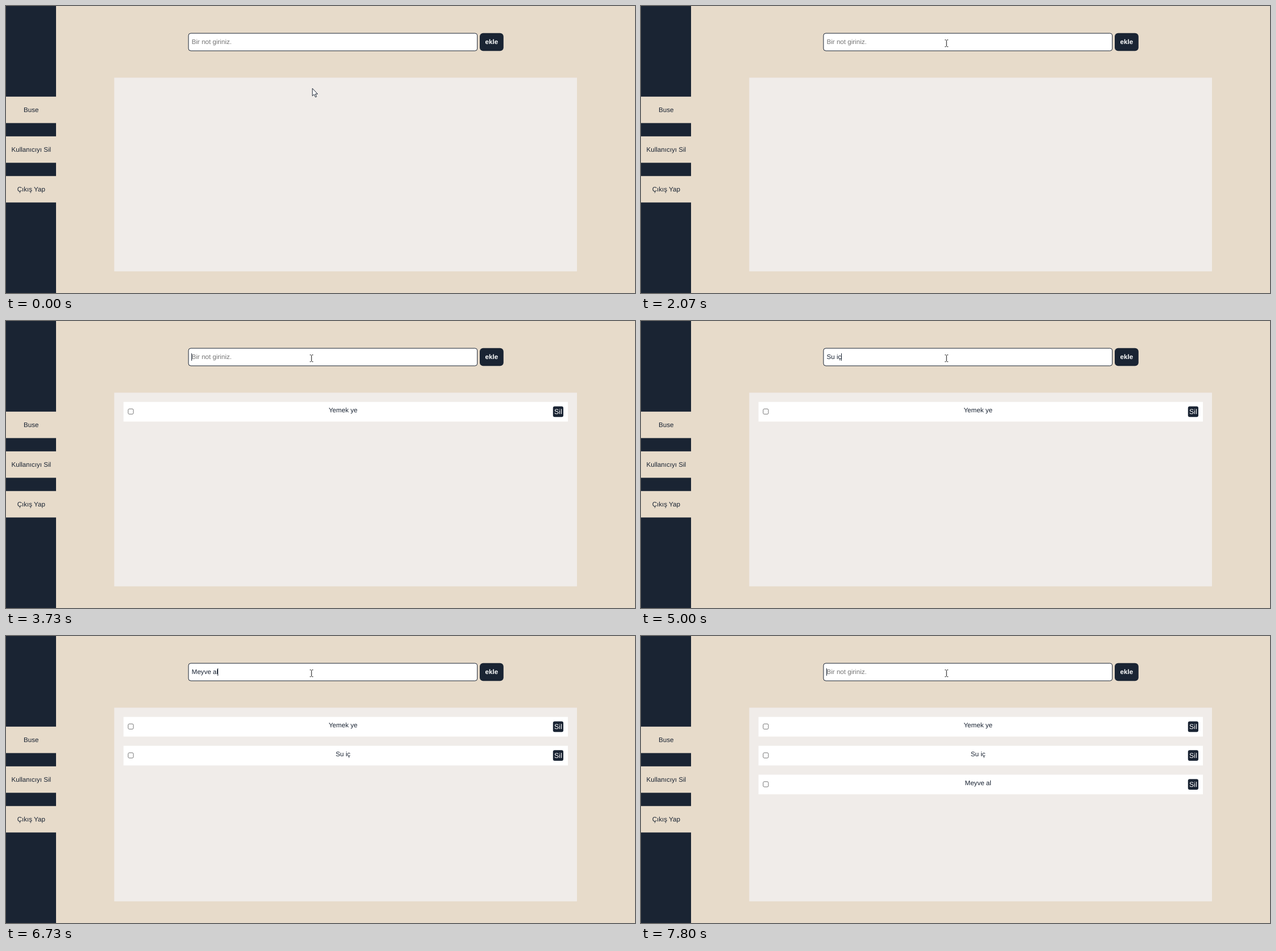
These frames come from a looping animation (1106x506 px, 8 s). An HTML page:

```html
<!DOCTYPE html>
<html lang="tr">
<head>
<meta charset="utf-8">
<style>
  html, body { margin: 0; width: 100%; height: 100%; overflow: hidden; background: #e7dbca; }
  svg { display: block; width: 1106px; height: 506px; }
  text { font: 11.6px "Liberation Sans", Arial, sans-serif; fill: #1a2433; white-space: pre; text-rendering: geometricPrecision; }
  .mid { text-anchor: middle; }
  .dark { fill: #1a2433; }
  .sand { fill: #e7dbca; }
  #field.hint { fill: #757575; }
  .add { font-weight: bold; fill: #fff; }
  .delete { font-size: 12.4px; fill: #fff; }
</style>
</head>
<body>
<svg viewBox="0 0 1106 506">
  <rect class="sand" width="1106" height="506"/>
  <rect class="dark" width="88" height="506"/>
  <g id="menu"></g>
  <rect x="320.9" y="48.1" width="507.8" height="30.9" rx="4" fill="#fff" stroke="#1a2433"/>
  <text id="field" x="326.5" y="67"></text>
  <rect id="caret" class="dark" y="57" width="1" height="13"/>
  <rect class="dark" x="833" y="47.7" width="41.8" height="31.6" rx="6"/>
  <text class="mid add" x="853.9" y="67">ekle</text>
  <rect x="190.3" y="126.4" width="813.7" height="341.4" fill="#f0ece9"/>
  <g id="list"></g>
  <path id="arrow" d="M0 0V13.2L3 10.5L5.3 15.4L7.3 14.5L5.1 9.8H9.2Z" fill="#fff" stroke="#1a2433" stroke-width="1"/>
  <path id="beam" d="M-3 -6H-.8M.8 -6H3M0 -5.5V5.5M-3 6H-.8M.8 6H3" fill="none" stroke="#222" stroke-width="1.1"/>
</svg>
<script>
const $ = id => document.getElementById(id);
const LOOP = 8000, FRAME = 200 / 3, FIELD_X = 326.5;

// Key press times for each note, then the time Enter adds it
const notes = [
  { text: "Yemek ye", keys: [2270, 2400, 2600, 2730, 2930, 3070, 3270, 3330], enter: 3730 },
  { text: "Su iç", keys: [4330, 4460, 4530, 4800, 5000], enter: 5270 },
  { text: "Meyve al", keys: [5800, 5930, 6070, 6200, 6330, 6470, 6600, 6730], enter: 7130 }
];
const caretHidden = [[0, 600], [1070, 1530], [2070, 2270], [3870, 4330], [5530, 5800], [7270, 7800]];

$("menu").innerHTML = ["Buse", "Kullanıcıyı Sil", "Çıkış Yap"].map((label, i) => `
  <rect class="sand" y="${159.8 + i * 70}" width="88" height="46.6"/>
  <text class="mid" x="44.3" y="${187.2 + i * 70}">${label}</text>`).join("");

$("list").innerHTML = notes.map((note, i) => `
  <g transform="translate(0 ${i * 50.9})">
    <rect x="206.6" y="142.7" width="781.4" height="34.6" fill="#fff"/>
    <rect x="214.8" y="155" width="9.2" height="9.2" rx="2" fill="#fff" stroke="#767676"/>
    <text class="mid" x="592.7" y="161.1">${note.text}</text>
    <rect class="dark" x="961.8" y="150.4" width="18.2" height="18.8" rx="3"/>
    <text class="mid delete" x="971" y="164.2">Sil</text>
  </g>`).join("");
const rows = [...$("list").children];

const show = (el, on) => el.style.display = on ? "" : "none";

function drawPointer(t) {
  const step = Math.floor((t + 1) / FRAME) * FRAME;
  const p = Math.min(step / 600, 1);
  const ease = p * p * (3 - 2 * p);
  const y = 145.3 - 79.6 * ease;
  const overField = y < 79;
  show($("arrow"), !overField);
  show($("beam"), overField);
  $(overField ? "beam" : "arrow").setAttribute("transform", `translate(${538.8 - 1.6 * ease} ${y})`);
}

function drawField(t) {
  const note = notes.find(n => t < n.enter);
  const typed = note ? note.text.slice(0, note.keys.filter(k => k <= t).length) : "";
  const field = $("field");
  field.textContent = typed || "Bir not giriniz.";
  field.classList.toggle("hint", !typed);
  const end = typed ? field.getComputedTextLength() : 0;
  $("caret").setAttribute("x", Math.floor(FIELD_X + end));
  show($("caret"), !caretHidden.some(([from, to]) => t >= from && t < to));
}

function draw() {
  const t = performance.now() % LOOP;
  drawPointer(t);
  drawField(t);
  rows.forEach((row, i) => show(row, t >= notes[i].enter));
  requestAnimationFrame(draw);
}
draw();
</script>
</body>
</html>
```
